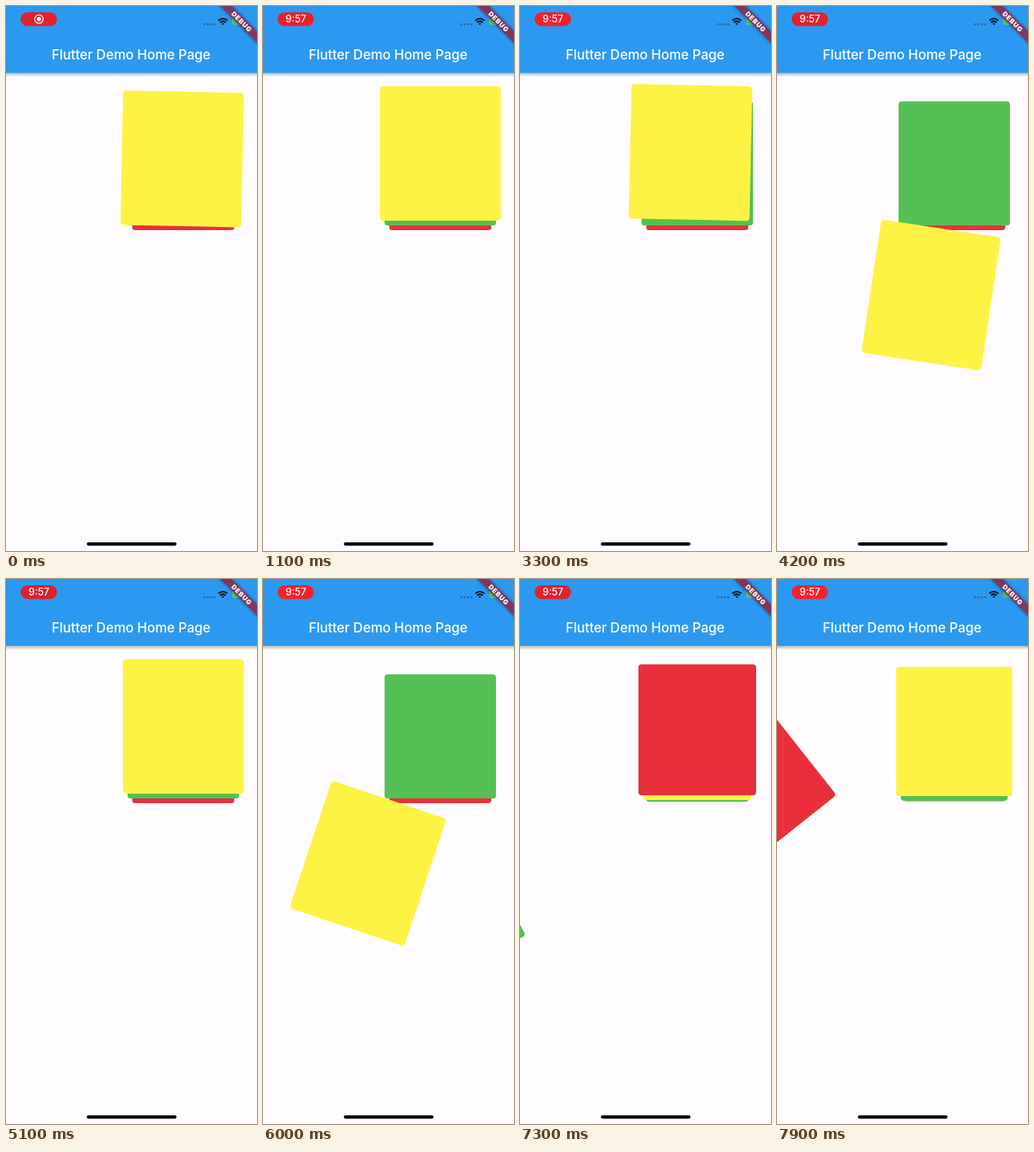
An HTML page for the animation above (8 s loop, 320x693 px).

```html
<!DOCTYPE html>
<html lang="en">
<head>
<meta charset="utf-8">
<title>Card stack</title>
<style>
html, body { margin: 0; width: 100%; height: 100%; overflow: hidden; background: #fefcff; }
svg { display: block; width: 320px; height: 693px; }
text { font-family: Inter, Roboto, sans-serif; fill: #fff; text-anchor: middle; }
</style>
</head>
<body>
<svg viewBox="0 0 320 693">
  <defs>
    <linearGradient id="shade" x2="0" y2="1">
      <stop stop-color="#000" stop-opacity=".28"/>
      <stop offset="1" stop-color="#000" stop-opacity="0"/>
    </linearGradient>
    <filter id="blur" x="-20%" y="-60%" width="140%" height="220%"><feGaussianBlur stdDeviation="2"/></filter>
  </defs>
  <rect width="320" height="693" fill="#fefcff"/>
  <g id="cards"></g>

  <rect y="85" width="320" height="5" fill="url(#shade)"/>
  <rect width="320" height="85" fill="#2c99f0"/>
  <text x="159.5" y="67.7" font-size="17" font-weight="500">Flutter Demo Home Page</text>

  <rect id="pill" x="18.5" y="8" width="46.5" height="17.5" rx="8.75"/>
  <g id="record">
    <circle cx="42" cy="16.7" r="5.4" fill="none" stroke="#fff" stroke-width="1.3"/>
    <circle cx="42" cy="16.7" r="2.7" fill="#fff"/>
  </g>
  <text id="clock" x="42" y="21" font-size="12.5" font-weight="500">9:57</text>

  <path d="M251.5 23.2H267" stroke="#1d62a0" stroke-width="2" stroke-dasharray="2.4 1.9"/>
  <g fill="none" stroke="#0b1520" stroke-width="2">
    <path d="M270.7 18.6Q276.5 13.4 282.3 18.6M272.8 21Q276.5 17.8 280.2 21"/>
    <path d="M276.5 24.3L274.8 22.5Q276.5 21.2 278.2 22.5Z" fill="#0b1520" stroke="none"/>
  </g>
  <rect x="288" y="14.8" width="16" height="9.4" rx="2.6" fill="#8cc8f2" stroke="#3c86bd" stroke-width=".8"/>
  <rect x="289" y="15.6" width="9" height="7.8" rx="1.8" fill="#43d05c"/>

  <g transform="translate(320) rotate(45)">
    <rect x="-40" y="23" width="80" height="9.9" fill="#000" opacity=".5" filter="url(#blur)"/>
    <rect x="-40" y="23" width="80" height="9.9" fill="#81375b"/>
    <text x=".4" y="31" font-size="8.4" font-weight="900" letter-spacing=".8">DEBUG</text>
  </g>

  <rect x="103" y="682" width="114.5" height="4.2" rx="2.1" fill="#000"/>
</svg>
<script>
const LOOP = 8000, STEP = 100, FLY = 300;
const W = 154, H = 171, CX = 226, BOTTOM = 273;
const colors = ['#fef344', '#55c053', '#e92f3a'];
const releases = [6100, 7100, 7750];

// Front card pose: time, x offset, y offset, angle
const poses = [
  [0, -1.4, 7, 1.1], [350, -40, 45, 7], [650, -50, 40, 8], [950, 0, 0, 0],
  [1200, 0, 0, 0], [1800, -45, 55, 8], [2200, -60, 30, 9], [2600, -43.5, -2, 7.3],
  [3000, -55, -8, 8], [3400, 0, 0, 0], [3650, 0, 0, 0], [4200, -29.5, 180, 8.6],
  [4550, -50, 268, 13], [4950, 0, 0, 0], [5300, 0, 0, 0], [5750, -60, 150, 12],
  [6100, -100, 180, 20], [6400, -460, 290, 85], [6400, 0, 0, 0], [6720, 0, 0, 0],
  [7100, -90, 150, 18], [7400, -450, 280, 85], [7400, 0, 0, 0], [7450, 0, 0, 0],
  [7750, -90, 40, 18.2], [8050, -440, 120, 85]
];

const $ = id => document.getElementById(id);
const cards = Array.from({ length: 4 }, () => {
  const rect = document.createElementNS('http://www.w3.org/2000/svg', 'rect');
  for (const [name, value] of Object.entries({ x: -W / 2, y: -H / 2, width: W, height: H, rx: 4.2 }))
    rect.setAttribute(name, value);
  $('cards').prepend(rect);
  return rect;
});

function poseAt(t, flying) {
  const i = poses.findIndex(p => p[0] > t);
  const [a, b] = [poses[i - 1], poses[i]];
  const u = (t - a[0]) / (b[0] - a[0]);
  const k = flying ? u : u * u * (3 - 2 * u);
  return a.slice(1).map((v, j) => v + (b[j + 1] - v) * k);
}

function draw(t) {
  const gone = releases.filter(r => t >= r + FLY).length;
  const p = gone < 3 ? Math.max(0, (t - releases[gone]) / FLY) : 0;
  const [dx, dy, angle] = poseAt(t, p > 0);

  cards.forEach((card, i) => {
    card.setAttribute('fill', colors[(gone + i) % 3]);
    if (i === 0) {
      card.setAttribute('transform', `translate(${CX + dx} ${BOTTOM - H / 2 + dy}) rotate(${angle})`);
      return;
    }
    const slot = i - p;
    const scale = 1 - 0.078 * Math.min(slot, 2);
    const bottom = i < 3 ? BOTTOM + 6 * slot : 280 + 5 * p;
    card.setAttribute('transform', `translate(${CX} ${bottom - H * scale / 2}) scale(${scale})`);
    card.setAttribute('visibility', i < 3 || p > 0 ? 'visible' : 'hidden');
  });

  const recording = t < 600;
  $('record').setAttribute('visibility', recording ? 'visible' : 'hidden');
  $('clock').setAttribute('visibility', recording ? 'hidden' : 'visible');
  const glow = Math.cos((t - 7900) / 2120 * 2 * Math.PI);
  $('pill').setAttribute('fill', `rgb(${230 + 20 * glow}, 32, 45)`);
}

const start = performance.now();
function tick() {
  const t = (performance.now() - start) % LOOP;
  draw(Math.floor(t / STEP) * STEP);
  requestAnimationFrame(tick);
}
tick();
</script>
</body>
</html>
```
